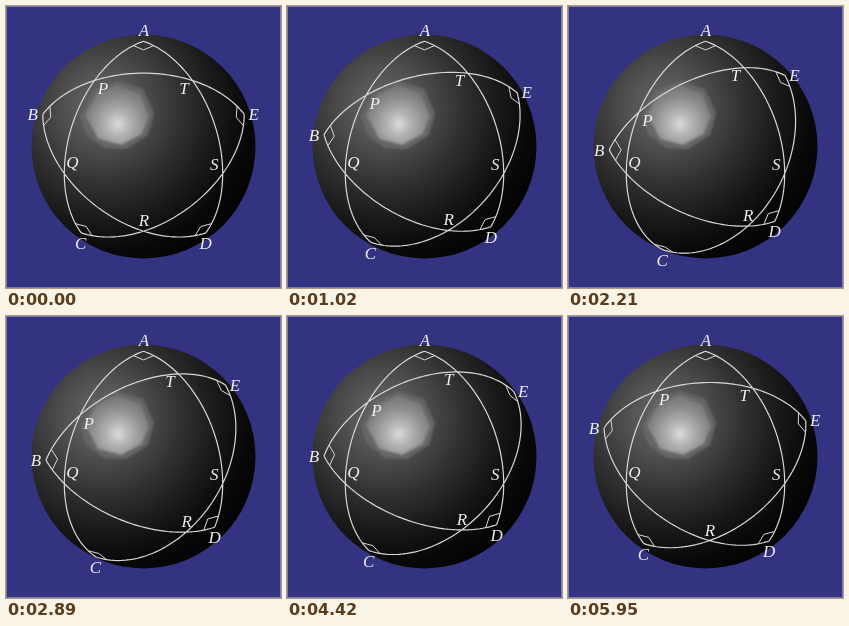
An HTML page for the animation above (6.12 s loop, 275 px wide and 282 px high).

```html
<!DOCTYPE html>
<html lang="en">
<head>
<meta charset="utf-8">
<title>Pentagramma mirificum</title>
<style>
  html, body { margin: 0; width: 100%; height: 100%; overflow: hidden; background: #333382; }
  svg { display: block; width: 275px; height: 282px; }
  path { fill: none; stroke: #d8d8d8; stroke-width: 1.2; stroke-linejoin: round; }
  #marks { stroke-width: 1; }
  text { font: italic 17px "Liberation Serif", "Noto Serif", serif; fill: #f0f0f0; text-anchor: middle; }
</style>
</head>
<body>
<svg viewBox="0 0 275 282">
  <defs>
    <radialGradient id="body" gradientUnits="userSpaceOnUse" cx="97" cy="101" r="170">
      <stop offset="0" stop-color="#686868"/>
      <stop offset=".2" stop-color="#545454"/>
      <stop offset=".46" stop-color="#313131"/>
      <stop offset=".7" stop-color="#161616"/>
      <stop offset=".86" stop-color="#080808"/>
      <stop offset="1" stop-color="#020202"/>
    </radialGradient>
    <radialGradient id="shine" gradientUnits="userSpaceOnUse" cx="112" cy="118" r="38">
      <stop offset="0" stop-color="#dcdcdc"/>
      <stop offset=".3" stop-color="#b4b4b4"/>
      <stop offset=".7" stop-color="#8c8c8c"/>
      <stop offset="1" stop-color="#747474"/>
    </radialGradient>
    <filter id="soft"><feGaussianBlur stdDeviation="1"/></filter>
  </defs>
  <rect x=".5" y=".5" width="274" height="281" fill="#333382" stroke="#7c7cae"/>
  <circle cx="137.5" cy="140.5" r="112" fill="url(#body)"/>
  <g filter="url(#soft)">
    <polygon points="74,110 88,84 112,75 137,83 148,107 142,129 120,143 98,142 80,128" fill="#666662"/>
    <polygon points="79,109 90,89 111,79 134,88 143,110 136,128 115,139 92,133" fill="url(#shine)" stroke="#707086"/>
  </g>
  <path id="arcs"/>
  <path id="marks"/>
  <g id="labels"></g>
</svg>
<script>
const STEP = 170, STEPS = 36, LEG = 12;
const CX = 137.5, CY = 140.5, RADIUS = 112;
const TILT = 20 * Math.PI / 180, MARK = 0.13;

// Start, middle and end of each leg, in degrees, for the arcs QC and SD.
const legs = [
  { u: [38.2, 47.5, 58.3], v: [38.2, 33.2, 30] },
  { u: [58.3, 52.2, 47.3], v: [30, 25.5, 22.3] },
  { u: [47.3, 42.5, 38.2], v: [22.3, 29.4, 38.2] }
];
const arcs = ["AC", "AD", "BE", "BD", "CE"];
const corners = ["AQS", "BPQ", "CQR", "DRS", "EST"];
const offsets = {
  A: [0.5, -9.5], B: [-10, 1.5], C: [-0.5, 12], D: [0, 11.5], E: [9.5, 1],
  P: [8.5, 9], Q: [8, -10], R: [0.5, -9.5], S: [-8.5, -8.5], T: [-8.5, 8.5]
};

const dot = (a, b) => a.reduce((sum, x, i) => sum + x * b[i], 0);
const mix = (a, k, b, m) => a.map((x, i) => k * x + m * b[i]);
const unit = a => a.map(x => x / Math.hypot(...a));
const cross = (a, b) => [
  a[1] * b[2] - a[2] * b[1],
  a[2] * b[0] - a[0] * b[2],
  a[0] * b[1] - a[1] * b[0]
];
// Unit tangent at a, pointing towards b.
const toward = (a, b) => unit(mix(b, 1, a, -dot(a, b)));

// Coordinates run along the fixed orthogonal directions A, Q and S.
function project([a, q, s]) {
  const x = (s - q) * Math.SQRT1_2;
  const y = a * Math.cos(TILT) - (q + s) * Math.SQRT1_2 * Math.sin(TILT);
  return [CX + RADIUS * x, CY - RADIUS * y];
}

const polyline = pts => "M" + pts.map(p => project(p).map(n => n.toFixed(2)).join(",")).join("L");

function arcPath(a, b) {
  const angle = Math.acos(dot(a, b)), dir = toward(a, b);
  return polyline(Array.from({ length: 61 }, (_, i) => {
    const t = angle * i / 60;
    return mix(a, Math.cos(t), dir, Math.sin(t));
  }));
}

function markPath(v, a, b) {
  const da = toward(v, a), db = toward(v, b);
  const at = (i, j) => unit(mix(mix(v, 1, da, i * MARK), 1, db, j * MARK));
  return polyline([at(1, 0), at(1, 1), at(0, 1)]);
}

const through = ([a, b, c], t) =>
  2 * a * (t - 0.5) * (t - 1) + 4 * b * t * (1 - t) + 2 * c * t * (t - 0.5);

function solve(step) {
  const leg = legs[Math.floor(step / LEG)], t = (step % LEG) / LEG;
  const [u, v] = [leg.u, leg.v].map(k => through(k, t) * Math.PI / 180);
  const P = [Math.cos(u), Math.sin(u), 0];
  const T = [Math.cos(v), 0, Math.sin(v)];
  const R = unit(cross(T, P));
  return {
    A: [1, 0, 0], Q: [0, 1, 0], S: [0, 0, 1], P, T, R,
    B: unit(cross(R, T)),
    C: [-Math.sin(u), Math.cos(u), 0],
    D: [-Math.sin(v), 0, Math.cos(v)],
    E: unit(cross(P, R))
  };
}

const get = id => document.getElementById(id);
const labels = {};
for (const name in offsets) {
  const el = document.createElementNS("http://www.w3.org/2000/svg", "text");
  el.textContent = name;
  labels[name] = get("labels").appendChild(el);
}

function draw(step) {
  const pts = solve(step);
  const build = (list, fn) => list.map(s => fn(...[...s].map(c => pts[c]))).join("");
  get("arcs").setAttribute("d", build(arcs, arcPath));
  get("marks").setAttribute("d", build(corners, markPath));
  for (const name in labels) {
    const [x, y] = project(pts[name]), [dx, dy] = offsets[name];
    labels[name].setAttribute("x", x + dx);
    labels[name].setAttribute("y", y + dy + 4.5);
  }
}

const start = performance.now();
let shown = 0;
function tick() {
  const step = Math.floor((performance.now() - start) / STEP) % STEPS;
  if (step !== shown) draw(shown = step);
  requestAnimationFrame(tick);
}
draw(0);
requestAnimationFrame(tick);
</script>
</body>
</html>
```
